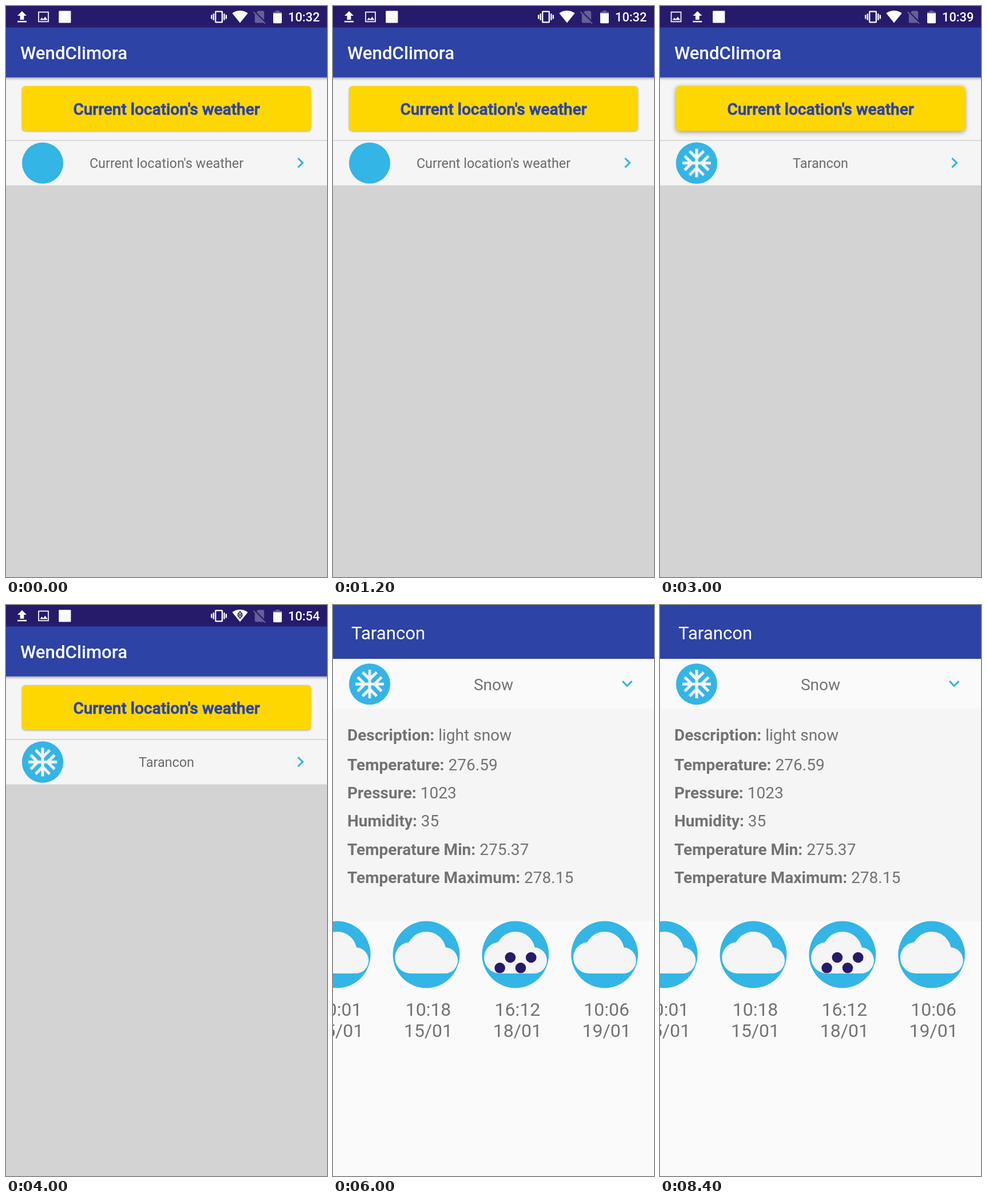
Recreate the animation shown at these times as an HTML page. Size 561x998 px, loop 10 s.

```html
<!DOCTYPE html>
<html lang="en">
<head>
<meta charset="utf-8">
<title>Weather app</title>
<style>
  html, body { margin: 0; width: 100%; height: 100%; overflow: hidden; background: #fafafa; }
  svg { display: block; width: 100vw; height: 100vh; }
  text { font-family: Roboto, "Noto Sans", sans-serif; fill: #737373; white-space: pre; }
  .mid { text-anchor: middle; }
  .title { font-size: 31.2px; fill: #fff; }
  .medium { font-weight: 500; }
  .clock { font-size: 21.8px; font-weight: 500; fill: #fff; }
  .item { font-size: 23.37px; fill: #6b6b6b; }
  .info { font-size: 28.05px; }
  .info tspan { font-weight: 700; }
  .slot { font-size: 32px; }
  .cta { font-size: 28.05px; font-weight: 500; fill: #2d43a5; stroke: #2d43a5; stroke-width: .88; }
  .bar { fill: #2d43a5; filter: drop-shadow(0 2px 2.2px rgba(0,0,0,.36)); }
  .arrow { fill: none; stroke: #33b5e5; stroke-width: 3.1; }

  /* every change is a hard cut within one 10 s loop */
  .list, .detail, .first, .second, .third, .place, .left, .right, .button {
    animation: 10s step-end infinite;
  }
  .list { animation-name: list; }
  .detail { animation-name: detail; }
  .first { animation-name: first; }
  .second { animation-name: second; }
  .third { animation-name: third; }
  .place { animation-name: place; }
  .left { animation-name: left; }
  .right { animation-name: right; }
  .button { animation-name: press; }
  @keyframes list { 0% { opacity: 1 } 60%, 100% { opacity: 0 } }
  @keyframes detail { 0% { opacity: 0 } 60%, 100% { opacity: 1 } }
  @keyframes first { 0% { opacity: 1 } 30%, 100% { opacity: 0 } }
  @keyframes second { 0% { opacity: 0 } 30% { opacity: 1 } 40%, 100% { opacity: 0 } }
  @keyframes third { 0% { opacity: 0 } 40%, 100% { opacity: 1 } }
  @keyframes place { 0% { opacity: 0 } 30%, 100% { opacity: 1 } }
  @keyframes left { 0% { transform: none } 20% { transform: translateX(37.4px) } 40%, 100% { transform: none } }
  @keyframes right { 0% { transform: none } 20% { transform: translateX(-37.4px) } 40%, 100% { transform: none } }
  @keyframes press {
    0% { filter: drop-shadow(0 1.2px 1.4px rgba(0,0,0,.34)) }
    20% { filter: drop-shadow(0 2.4px 4px rgba(0,0,0,.42)) }
    40%, 100% { filter: drop-shadow(0 1.2px 1.4px rgba(0,0,0,.34)) }
  }
</style>
</head>
<body>
<svg viewBox="0 0 561 998">
  <defs>
    <g id="snow">
      <circle r="36" fill="#33b5e5"/>
      <path transform="scale(2.5) translate(-12 -12)" fill="#f5f5f5" d="M22 11h-4.17l3.24-3.24-1.41-1.42L15 11h-2V9l4.66-4.66-1.42-1.41L13 6.17V2h-2v4.17L7.76 2.93 6.34 4.34 11 9v2H9L4.34 6.34 2.93 7.76 6.17 11H2v2h4.17l-3.24 3.24 1.41 1.42L9 13h2v2l-4.66 4.66 1.42 1.41L11 17.83V22h2v-4.17l3.24 3.24 1.42-1.41L13 15v-2h2l4.66 4.66 1.41-1.42L17.83 13H22v-2z"/>
    </g>
    <g id="cloud">
      <circle r="58.4" fill="#33b5e5"/>
      <path transform="translate(-54.6 -58.4) scale(4.57)" fill="#f5f5f5" d="M19.35 10.04C18.67 6.59 15.64 4 12 4 9.11 4 6.6 5.64 5.35 8.04 2.34 8.36 0 10.91 0 14c0 3.31 2.69 6 6 6h13c2.76 0 5-2.24 5-5 0-2.64-2.05-4.78-4.65-4.96z"/>
    </g>
  </defs>

  <g class="list">
    <rect width="561" height="998" fill="#d3d3d3"/>
    <rect y="120" width="561" height="193.5" fill="#f5f5f5"/>
    <rect y="234.2" width="561" height="1.6" fill="#d3d3d3"/>
    <rect class="bar" x="-10" y="30" width="581" height="94.7"/>
    <rect width="561" height="37.5" fill="#261b6b"/>

    <g fill="#fff">
      <path class="left" d="M20 28.4h16v-2.3H20zM20 17h4.6v6.9h6.8V17H36l-8-8z"/>
      <g class="right">
        <path fill="none" stroke="#fff" stroke-width="1.7" d="M57 10.6h17v16.8h-17z"/>
        <path d="M59.3 24.6l3.3-4.3 2.4 2.9 3.4-4.4 4.3 5.8z"/>
      </g>
      <rect x="92.2" y="8.5" width="21.2" height="21" rx="1"/>
      <path transform="translate(358 5) scale(1.167)" d="M0 15h2V9H0v6zm3 2h2V7H3v10zm19-8v6h2V9h-2zm-3 8h2V7h-2v10zM16.5 3h-9C6.67 3 6 3.67 6 4.5v15c0 .83.67 1.5 1.5 1.5h9c.83 0 1.5-.67 1.5-1.5v-15c0-.83-.67-1.5-1.5-1.5zM16 19H8V5h8v14z"/>
      <path transform="translate(395 4.5) scale(1.167)" d="M12 21.5 23.64 7C23.19 6.66 18.71 3 12 3 5.28 3 .81 6.66.36 7z"/>
      <path class="third" fill="none" stroke="#261b6b" stroke-width="1.5" d="M409 11.2l3.8 4.9h-7.6zM405.2 18.6h7.6l-3.8 4.5z"/>
      <path opacity=".3" transform="translate(429 5) scale(1.167)" d="M18.99 5c0-1.1-.89-2-1.99-2h-7L7.66 5.34 19 16.68 18.99 5zM3.65 3.88L2.38 5.15 5 7.77V19c0 1.1.9 2 2 2h10.01c.35 0 .67-.1.96-.26l1.88 1.88 1.27-1.27L3.65 3.88z"/>
      <path opacity=".3" d="M467 12.6v-1.2q0-1.2 1.2-1.2h3V8h6.6v2.2h3q1.2 0 1.2 1.2v1.2z"/>
      <path d="M467 12.6h15v16.2q0 1.4-1.4 1.4h-12.2q-1.4 0-1.4-1.4z"/>
    </g>
    <text class="clock first" x="493" y="27">10:32</text>
    <text class="clock second" x="493" y="27">10:39</text>
    <text class="clock third" x="493" y="27">10:54</text>

    <text class="title medium" x="24.9" y="93">WendClimora</text>
    <rect class="button" x="28" y="140" width="505" height="78.3" rx="6" fill="#ffd700"/>
    <text class="cta mid" x="280.5" y="190">Current location's weather</text>

    <circle cx="64" cy="274.5" r="36" fill="#33b5e5"/>
    <use class="place" href="#snow" x="64" y="274.5"/>
    <text class="item mid first" x="280.5" y="283.3">Current location's weather</text>
    <text class="item mid place" x="280.5" y="283.3">Tarancon</text>
    <path class="arrow" d="M510.3 266l8.2 8.1-8.2 8.1"/>
  </g>

  <g class="detail">
    <rect width="561" height="998" fill="#fafafa"/>
    <rect y="181" width="561" height="371.5" fill="#f5f5f5"/>
    <rect class="bar" x="-10" y="-10" width="581" height="104" style="filter:drop-shadow(0 .8px .8px rgba(0,0,0,.3))"/>
    <text class="title" x="32" y="60">Tarancon</text>
    <use href="#snow" x="64" y="138.3"/>
    <text class="info mid" x="280.5" y="149">Snow</text>
    <path class="arrow" d="M506 133.2l8.2 8.2 8.2-8.2"/>

    <text class="info" x="24.9" y="237"><tspan>Description:</tspan> light snow</text>
    <text class="info" x="24.9" y="288.6"><tspan>Temperature:</tspan> 276.59</text>
    <text class="info" x="24.9" y="338"><tspan>Pressure:</tspan> 1023</text>
    <text class="info" x="24.9" y="387.4"><tspan>Humidity:</tspan> 35</text>
    <text class="info" x="24.9" y="436.8"><tspan>Temperature Min:</tspan> 275.37</text>
    <text class="info" x="24.9" y="486.2"><tspan>Temperature Maximum:</tspan> 278.15</text>

    <g class="slot mid">
      <use href="#cloud" x="7.2" y="611"/>
      <text x="10.7" y="718">10:01</text><text x="10.7" y="755">15/01</text>
      <use href="#cloud" x="163" y="611"/>
      <text x="166.5" y="718">10:18</text><text x="166.5" y="755">15/01</text>
      <use href="#cloud" x="318.8" y="611"/>
      <text x="322.3" y="718">16:12</text><text x="322.3" y="755">18/01</text>
      <use href="#cloud" x="474.6" y="611"/>
      <text x="478.1" y="718">10:06</text><text x="478.1" y="755">19/01</text>
    </g>
    <g fill="#261b6b">
      <circle cx="309.8" cy="616" r="9.3"/>
      <circle cx="346.2" cy="616" r="9.3"/>
      <circle cx="291.6" cy="634.3" r="9.3"/>
      <circle cx="328" cy="634.3" r="9.3"/>
    </g>
  </g>
</svg>
</body>
</html>
```
